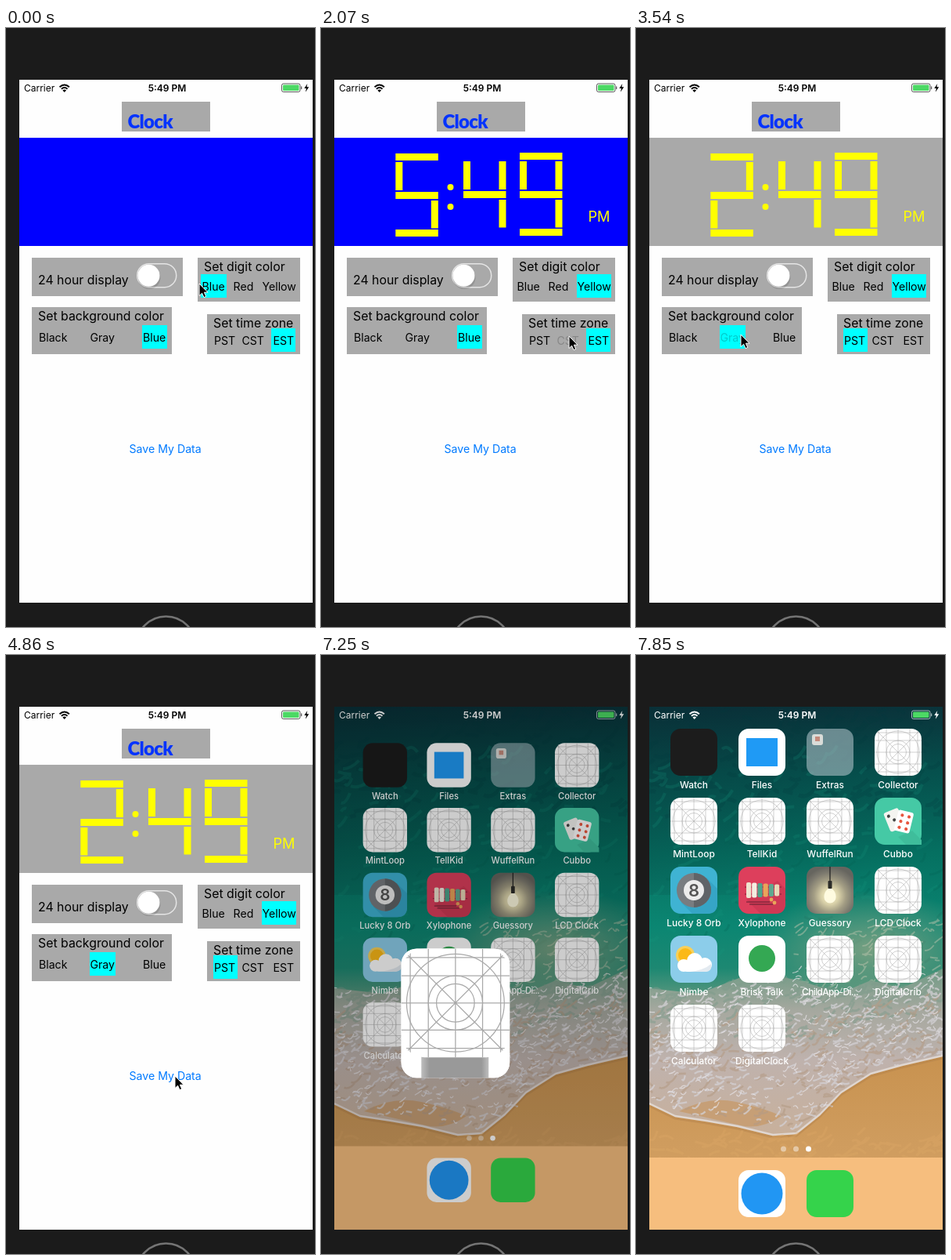
An HTML page that plays this animation: 395 px wide and 764 px high, repeating every 7.99 s.

```html
<!DOCTYPE html>
<html lang="en">
<head>
<meta charset="utf-8">
<title>Clock app</title>
<style>
html, body { margin: 0; width: 100%; height: 100%; overflow: hidden; background: #1b1b1b; }
svg { display: block; width: 395px; height: 764px; }
text { font-family: Inter, Roboto, "Liberation Sans", sans-serif; white-space: pre; }
.head { font-size: 15.85px; }
.btn { font-size: 14.15px; }
.label { font-size: 11.9px; font-weight: 500; fill: #fff; text-anchor: middle; }
</style>
</head>
<body>
<svg id="stage" viewBox="0 0 395 764" xmlns="http://www.w3.org/2000/svg"></svg>
<script>
const LOOP = 7990, HOME = 46, LANDED = 51;
const GRAY = '#a9a9a9';

let seed = 11;
const rnd = () => (seed = (seed * 16807) % 2147483647) / 2147483647;
const span = (a, b) => a + (b - a) * rnd();
const rect = (x, y, w, h, fill, more = '') =>
  `<rect x="${x}" y="${y}" width="${w}" height="${h}" fill="${fill}" ${more}/>`;
const circle = (x, y, r, fill, more = '') =>
  `<circle cx="${x}" cy="${y}" r="${r}" fill="${fill}" ${more}/>`;
const text = (x, y, s, more = '') => `<text x="${x}" y="${y}" ${more}>${s}</text>`;
const path = (d, fill, more = '') => `<path d="${d}" fill="${fill}" ${more}/>`;
const line = (d, color, width, more = '') =>
  path(d, 'none', `stroke="${color}" stroke-width="${width}" ${more}`);

// Linear interpolation through [position, value...] points.
function along(points, at, col = 1) {
  let i = 1;
  while (i < points.length - 1 && points[i][0] < at) i++;
  const a = points[i - 1], b = points[i];
  const k = Math.max(0, Math.min(1, (at - a[0]) / (b[0] - a[0])));
  return a[col] + (b[col] - a[col]) * k;
}

function statusBar(color) {
  return `<g color="${color}" fill="currentColor">
    ${text(23, 81, 'Carrier', 'font-size="12"')}
    ${text(206, 80.5, '5:49 PM', 'font-size="12" font-weight="600" text-anchor="middle"')}
    ${line('M68.5 75.3Q74.7 69.6 80.9 75.3M70.9 77.8Q74.7 74.3 78.5 77.8', 'currentColor', 1.9)}
    ${path('M72.4 79.4Q74.7 77.6 77 79.4L74.7 82Z', 'currentColor')}
    ${rect(352.5, 71, 23.5, 10.5, 'none', 'rx="2.2" stroke="currentColor" stroke-opacity=".65"')}
    ${rect(354, 72.5, 20.5, 7.5, '#4cd964', 'rx="1"')}
    ${rect(377, 74.5, 1.3, 3.6, 'currentColor', 'opacity=".6"')}
    ${path('M385.3 71L381.3 77H383.9L382.8 81.8L387.2 75.3H384.4Z', 'currentColor')}</g>`;
}

// --- clock app ---
const buttons = [
  { s: 'Blue', x: 250.5, y: 334.5, hx: 249, hw: 33, on: -9, off: 3 },
  { s: 'Red', x: 290.5, y: 334.5, hx: 290, hw: 28, on: 3, off: 6 },
  { s: 'Yellow', x: 327.5, y: 334.5, hx: 327, hw: 44, on: 6, off: 99 },
  { s: 'Black', x: 42, y: 399.5, hx: 41, hw: 38, on: 999, off: 999 },
  { s: 'Gray', x: 107.5, y: 399.5, hx: 107, hw: 33, on: 24, off: 99 },
  { s: 'Blue', x: 175, y: 399.5, hx: 174, hw: 32, on: -9, off: 24 },
  { s: 'PST', x: 266, y: 403.5, hx: 265, hw: 31, on: 18, off: 99 },
  { s: 'CST', x: 301.5, y: 403.5, hx: 301, hw: 30, on: 15, off: 18 },
  { s: 'EST', x: 341.5, y: 403.5, hx: 339, hw: 31, on: -9, off: 15 }
];
const segments = { 2: 'abged', 4: 'fgbc', 5: 'afgcd', 9: 'abfgcd' };
const segmentBox = {
  a: [0, 0, 54.5, 9], g: [0, 49, 54.5, 9], d: [0, 97, 54.5, 9],
  f: [0, 11, 9, 36], b: [45.5, 11, 9, 36], e: [0, 60, 9, 35.5], c: [45.5, 60, 9, 35.5]
};
const digit = (n, x, y) => [...segments[n]].map(k => {
  const [sx, sy, w, h] = segmentBox[k];
  return rect(x + sx, y + sy, w, h, 'currentColor');
}).join('');

const app = `
  ${rect(17, 66, 375, 667, '#fefefe')}
  ${rect(148, 94, 113, 38, GRAY)}
  ${text(155.5, 128, 'Clock', 'style="font:900 24px Lato,sans-serif;letter-spacing:-.7px" fill="#0433ff"')}
  <rect id="panel" x="17" y="140" width="375" height="138"/>
  <g id="digits">
    <g id="hour"></g>
    ${circle(165.5, 203, 4, 'currentColor')}${circle(165.5, 228, 4, 'currentColor')}
    ${digit(4, 182, 159)}${digit(9, 254, 159)}
    ${text(341.5, 247, 'PM', 'font-size="18.2" fill="currentColor"')}
  </g>
  ${rect(33, 293, 193, 49, GRAY)}${rect(245, 293, 131, 56, GRAY)}
  ${rect(33, 356, 179, 60, GRAY)}${rect(257, 365, 119, 51, GRAY)}
  ${text(41, 326.5, '24 hour display', 'class="head"')}
  ${text(253, 309.5, 'Set digit color', 'class="head"')}
  ${text(41, 372.5, 'Set background color', 'class="head"')}
  ${text(265, 381.5, 'Set time zone', 'class="head"')}
  ${rect(167.7, 300.7, 50, 30, 'none', 'rx="15" stroke="#e5e5e5" stroke-width="1.5"')}
  ${circle(183, 318.5, 14.5, '#000', 'opacity=".12"')}${circle(182.5, 315.8, 14, '#fff')}
  ${buttons.map((b, i) => rect(b.hx, b.y - 20.5, b.hw, 30, '#0ff', `id="hi${i}"`) +
    text(b.x, b.y, b.s, `class="btn" id="bt${i}"`)).join('')}
  ${text(157.5, 542, 'Save My Data', 'class="btn" id="save" fill="#007aff"')}`;

// --- wallpaper ---
const foamTop = [[17, 425], [80, 432], [150, 405], [210, 415], [260, 432], [300, 415], [340, 425], [392, 400]];
const shore = [[17, 572], [50, 588], [90, 594], [130, 601], [175, 612], [205, 610], [235, 586],
  [262, 558], [300, 534], [340, 523], [392, 511]];
const trace = pts => pts.map(p => p.join(' ')).join('L');

function strokes(count, place, length, slope) {
  let d = '';
  for (let i = 0; i < count; i++) {
    const [x, y] = place(), w = span(.3, 1) * length, h = w * slope + span(-.5, .5) * length;
    d += `M${x.toFixed(1)} ${y.toFixed(1)}q${(w / 2).toFixed(1)} ${span(-6, 6).toFixed(1)} ${w.toFixed(1)} ${h.toFixed(1)}`;
  }
  return d;
}
const sea = (a, b) => () => [span(5, 392), span(a, b)];
const inFoam = (a, b) => () => {
  const x = span(10, 392), top = along(foamTop, x);
  return [x, top + (along(shore, x) - top) * span(a, b)];
};

const wallpaper = `
  ${rect(17, 66, 375, 667, 'url(#water)')}
  ${rect(17, 66, 375, 240, 'url(#shade)')}
  ${line(strokes(150, sea(60, 210), 20, -.4), '#04363b', 5, 'opacity=".22"')}
  ${line(strokes(130, sea(120, 390), 22, -.4), '#16967f', 4, 'opacity=".2"')}
  ${line(strokes(80, sea(200, 400), 18, -.4), '#045c50', 3, 'opacity=".22"')}
  ${rect(150, 300, 300, 150, 'url(#spray)')}
  ${line(strokes(110, () => [span(200, 392), span(340, 425)], 13, -.5), '#b9c4ac', 1.8, 'opacity=".5"')}
  ${path(`M17 733L${trace(shore)}L392 733Z`, 'url(#sand)')}
  ${path(`M${trace(foamTop)}L${trace([...shore].reverse())}Z`, 'url(#foam)')}
  ${path('M55 582Q92 562 128 570T186 588Q160 606 134 600T55 582Z', '#c79a68', 'opacity=".75"')}
  ${line(strokes(170, inFoam(0, .4), 14, -.35), '#7f9c8c', 3, 'opacity=".5"')}
  ${line(strokes(200, inFoam(.25, .97), 14, -.3), '#b59c86', 2.6, 'opacity=".6"')}
  ${line(strokes(340, inFoam(.02, .97), 12, -.3), '#d3d0d4', 2.2, 'opacity=".75"')}
  ${line(strokes(270, inFoam(-.08, .95), 9, -.3), '#e9e6ea', 1.2, 'opacity=".7"')}
  ${line(`M${trace(shore.map(([x, y]) => [x, y + 3]))}`, '#a87945', 3, 'opacity=".35"')}
  ${line(`M${trace(shore)}`, '#dfd6d0', 2.5, 'stroke-linejoin="round"')}
  ${line(strokes(70, () => [span(17, 392), span(612, 641)], 22, -.2), '#dca969', 3, 'opacity=".3"')}`;

// --- home screen icons, drawn in a 60 by 60 tile ---
const tile = (fill, art = '') => rect(0, 0, 60, 60, fill, 'rx="13"') + art;
const guide = (() => {
  let d = 'M0 0L60 60M60 0L0 60';
  for (const v of [5, 15, 30, 45, 55]) d += `M${v} 0V60M0 ${v}H60`;
  const rings = [27, 15, 10.5].map(r => circle(30, 30, r, 'none')).join('');
  return tile('#fff', `<g clip-path="url(#tileClip)" stroke="#a9a9a9" stroke-width=".55">${path(d, 'none')}${rings}</g>`);
})();
const pips = pts => pts.map(([x, y]) => circle(x, y, 2.1, '#e8563f')).join('');
const art = {
  watch: tile('#1c1c1c'),
  files: tile('#fff', rect(10, 12, 40, 36, '#1f9af5')),
  folder: tile('#a6bcc2', rect(7, 7, 14, 14, '#d9dcd8', 'rx="3"') + rect(11, 10, 6, 6, '#c48a7c'))
    .replace('fill="#a6bcc2"', 'fill="#a6bcc2" fill-opacity=".62"'),
  dice: tile('#45c9a5', path('M30 50L48 42L60 54V60H40Z', '#3fbd9b') +
    `<g transform="translate(11 20) rotate(-22)">${rect(0, 0, 20, 26, '#f4f4f0', 'rx="3"')}
      ${circle(5, 6, 2, '#444')}${circle(15, 20, 2, '#444')}${circle(10, 13, 2, '#444')}</g>
    <g transform="translate(31 15) rotate(14)">${rect(0, 0, 20, 27, '#fff', 'rx="3"')}
      ${pips([[6, 6], [15, 6], [6, 14], [15, 14], [6, 22], [15, 22]])}</g>`),
  ball: tile('#3fb3d3', path('M14 46L46 14L60 28V47Q60 60 47 60H28Z', '#36a5c6') + circle(30, 30, 22, '#787c80') +
    path('M30 8A22 22 0 0 1 30 52Z', '#606468') + circle(30, 30, 13, '#ececec') +
    text(30, 38, '8', 'font-size="22" font-weight="600" fill="#555" text-anchor="middle"')),
  xylo: tile('#dd3f5c', path('M10 42L50 18L60 28V47Q60 60 47 60H28Z', '#cf3854') +
    line('M8 26H55M8 35H55', '#7d2338', 1) +
    ['#eee3cf', '#f4efe2', '#4fa58c', '#e9a45a', '#5fa88f', '#e8d9b8']
      .map((c, i) => rect(10 + i * 7.2, 20 + i * .5, 6.2, 20 - i, c, 'rx="2"')).join('') +
    line('M10 45H40M14 48H44', '#5e2030', 1) +
    circle(42, 42, 2.4, '#e9a45a') + circle(46, 46, 2.4, '#e9a45a')),
  bulb: tile('url(#glow)', line('M30 0V20', '#222', 1.3) + rect(27.5, 18, 5, 10, '#2b2b28', 'rx="1"') +
    path('M27.5 28Q22 33 22.5 39A7.5 7.5 0 0 0 37.5 39Q38 33 32.5 28Z', '#fffbe0')),
  sky: tile('#8ccdea', circle(19, 25, 12, '#f6d05b') + circle(19, 25, 9, '#fbb917') +
    `<g fill="#fff"><circle cx="17" cy="38" r="8"/><circle cx="31" cy="32" r="10"/>
      <circle cx="44" cy="37" r="9"/><rect x="16" y="34" width="29" height="12" rx="5"/></g>` +
    path('M25 46Q43 44 52 36Q54 46 44 46Z', '#e3eaf0')),
  chat: tile('#fff', circle(30, 29, 17, '#34a853')),
  compass: tile('#fff', circle(30, 30, 26.5, '#2196f3')),
  message: tile('#35d34b')
};
const icons = [
  ['Watch', 'watch'], ['Files', 'files'], ['Extras', 'folder'], ['Collector'],
  ['MintLoop'], ['TellKid'], ['WuffelRun'], ['Cubbo', 'dice'],
  ['Lucky 8 Orb', 'ball'], ['Xylophone', 'xylo'], ['Guessory', 'bulb'], ['LCD Clock'],
  ['Nimbe', 'sky'], ['Brisk Talk', 'chat'], ['ChildApp-Di...', '', 'style="letter-spacing:-.6px"'], ['DigitalCrib'],
  ['Calculator'], ['DigitalClock', '', 'id="ownLabel"']
];
const place = (x, y, body, more = '') => `<g transform="translate(${x} ${y})" ${more}>${body}</g>`;
const grid = icons.map(([name, kind, more = ''], i) => {
  const x = 74 + 87 * (i % 4), y = 124 + 88 * Math.floor(i / 4);
  return place(x - 30, y - 30, art[kind] || guide, i === 17 ? 'id="ownIcon"' : '') +
    text(x, y + 46, name, `class="label" ${more}`);
}).join('');

const home = `
  ${wallpaper}
  <g id="board">
    ${grid}
    ${[188.5, 204.5, 220.5].map((x, i) => circle(x, 630, 3.5, '#fff', `opacity="${i < 2 ? .45 : 1}"`)).join('')}
    ${rect(-100, 641, 600, 300, '#f6be7e')}
    ${place(131, 657, art.compass)}${place(218, 657, art.message)}
  </g>
  ${statusBar('#fff')}
  <rect id="dim" x="17" y="66" width="375" height="667"/>`;

const stops = list => list.map(([o, c, a = 1]) =>
  `<stop offset="${o}" stop-color="${c}" stop-opacity="${a}"/>`).join('');
const fade = (id, list, dir = 'x2="0" y2="1"') => `<linearGradient id="${id}" ${dir}>${stops(list)}</linearGradient>`;
const glow = (id, list, dir = '') => `<radialGradient id="${id}" ${dir}>${stops(list)}</radialGradient>`;

document.getElementById('stage').innerHTML = `
  <defs>
    ${fade('water', [[0, '#0a3940'], [.12, '#055752'], [.28, '#057061'], [.42, '#0b8672'], [.5, '#1d8872'], [.56, '#5f987f']])}
    ${fade('shade', [[0, '#08242d', .45], [1, '#08242d', 0]], 'x2=".6" y2="1"')}
    ${glow('spray', [[0, '#8fa585', .8], [1, '#8fa585', 0]])}
    ${fade('foam', [[0, '#6f9a84'], [.25, '#a5a89f'], [.55, '#bfb2ad'], [1, '#c8b09b']])}
    ${fade('sand', [[0, '#c8924f'], [.5, '#cf9c5e'], [1, '#d7a467']])}
    ${fade('strip', [[0, '#fff'], [.18, '#fff'], [.19, '#bbb'], [.26, '#999'], [.74, '#999'], [.8, '#bbb'], [.81, '#fff']], 'x2="1"')}
    ${glow('glow', [[0, '#fff8cf'], [.3, '#d8d0a8'], [.55, '#a39d84'], [.8, '#7d7a6f'], [1, '#66655f']], 'cx=".5" cy=".62" r=".62"')}
    <clipPath id="screen"><rect x="17" y="66" width="375" height="667"/></clipPath>
    <clipPath id="tileClip"><rect width="60" height="60" rx="13"/></clipPath>
    <clipPath id="windowClip"><rect id="frame" x="17" y="66" width="375" height="667"/></clipPath>
  </defs>
  ${rect(0, 0, 395, 764, '#1b1b1b')}
  ${circle(204.5, 788.5, 38, '#181818', 'stroke="#747474" stroke-width="2.6"')}
  <g clip-path="url(#screen)">
    <g id="home">${home}</g>
    <g id="window" clip-path="url(#windowClip)">
      <g id="app">${app}</g>
      <g id="cover">${rect(-1, -1, 62, 200, '#fff')}<rect y="59" width="60" height="140" fill="url(#strip)"/>${guide}</g>
    </g>
    <g id="appStatus">${statusBar('#000')}</g>
  </g>
  <g id="cursor">${path('M0 0V15.5L3.6 12.2L6 17.6L8.7 16.4L6.4 11.2H11Z', '#000', 'stroke="#fff" stroke-width="1"')}</g>`;

// --- motion ---
const $ = id => document.getElementById(id);
const set = (id, attrs) => { for (const k in attrs) $(id).setAttribute(k, attrs[k]); };
const show = (id, on) => set(id, { display: on ? 'inline' : 'none' });

const cursorPath = [[0, 247, 326], [1, 258, 328], [2, 302, 330], [3, 304, 330], [5, 345, 332], [6, 345, 332],
  [8, 338, 349], [10, 328, 375], [12, 318, 396], [13, 317, 393], [15, 317, 393], [16, 300, 403], [17, 284, 399],
  [19, 284, 399], [20, 262, 405], [21, 205, 408], [22, 150, 398], [23, 134, 391], [24, 134, 391], [26, 137, 388],
  [27, 150, 420], [28, 185, 500], [29, 207, 562], [30, 213, 576], [32, 214, 537], [33, 216, 537], [40, 216, 537],
  [41, 213, 590], [42, 209, 700], [43, 208, 790]];
const closing = [[45, 0], [46, .05], [47, .25], [48, .52], [49, .75], [50, .92], [51, 1]];
const saveFade = [[34, 1], [35, .2], [36, .45], [37, .8], [38, 1]];

const tickAt = t => t < 4850 ? Math.floor((t + 6) / 147.4)
  : Math.min(53, 33 + Math.floor((t - 4850) / 149));

function drawApp(n) {
  buttons.forEach((b, i) => {
    show('hi' + i, n >= b.on && n < b.off);
    set('bt' + i, { opacity: n === b.on || n === b.on - 1 ? .2 : 1 });
  });
  set('panel', { fill: n < 24 ? '#00f' : GRAY });
  set('digits', { color: n < 3 ? '#00f' : n < 6 ? '#f00' : '#ff0' });
  $('hour').innerHTML = digit(n < 15 ? 5 : n < 18 ? 4 : 2, 95.3, 160);
  set('save', { opacity: along(saveFade, n) });
}

function drawHome(n) {
  const p = along(closing, n), tall = p ** .66, zoom = 1 - .24 * (1 - p);
  const w = 375 - 315 * p, h = 667 - 607 * tall;
  const x = 204.5 - 43.5 * p - w / 2, y = 399.5 + 76.5 * p - h / 2;
  const open = n < LANDED;
  show('home', n >= HOME);
  show('window', open);
  show('appStatus', n < HOME);
  show('ownIcon', !open);
  show('ownLabel', !open);
  set('board', { transform: `translate(204.5 399.5) scale(${zoom}) translate(-204.5 -399.5)` });
  set('dim', { opacity: Math.min(.55, .8 * (1 - p)) });
  set('frame', { x, y, width: w, height: h, rx: n < HOME ? 0 : 13 + 28 * (1 - p) });
  set('app', { transform: `translate(${x} ${y}) scale(${w / 375} ${h / 667}) translate(-17 -66)` });
  set('cover', { transform: `translate(${x} ${y}) scale(${w / 60})`, opacity: Math.min(1, p / .6) });
}

function render(t) {
  const n = tickAt(t);
  drawApp(n);
  drawHome(n);
  set('cursor', { transform: `translate(${along(cursorPath, n)} ${along(cursorPath, n, 2)})` });
}

let start;
function loop(now) {
  start ??= now;
  render((now - start) % LOOP);
  requestAnimationFrame(loop);
}
render(0);
requestAnimationFrame(loop);
</script>
</body>
</html>
```
